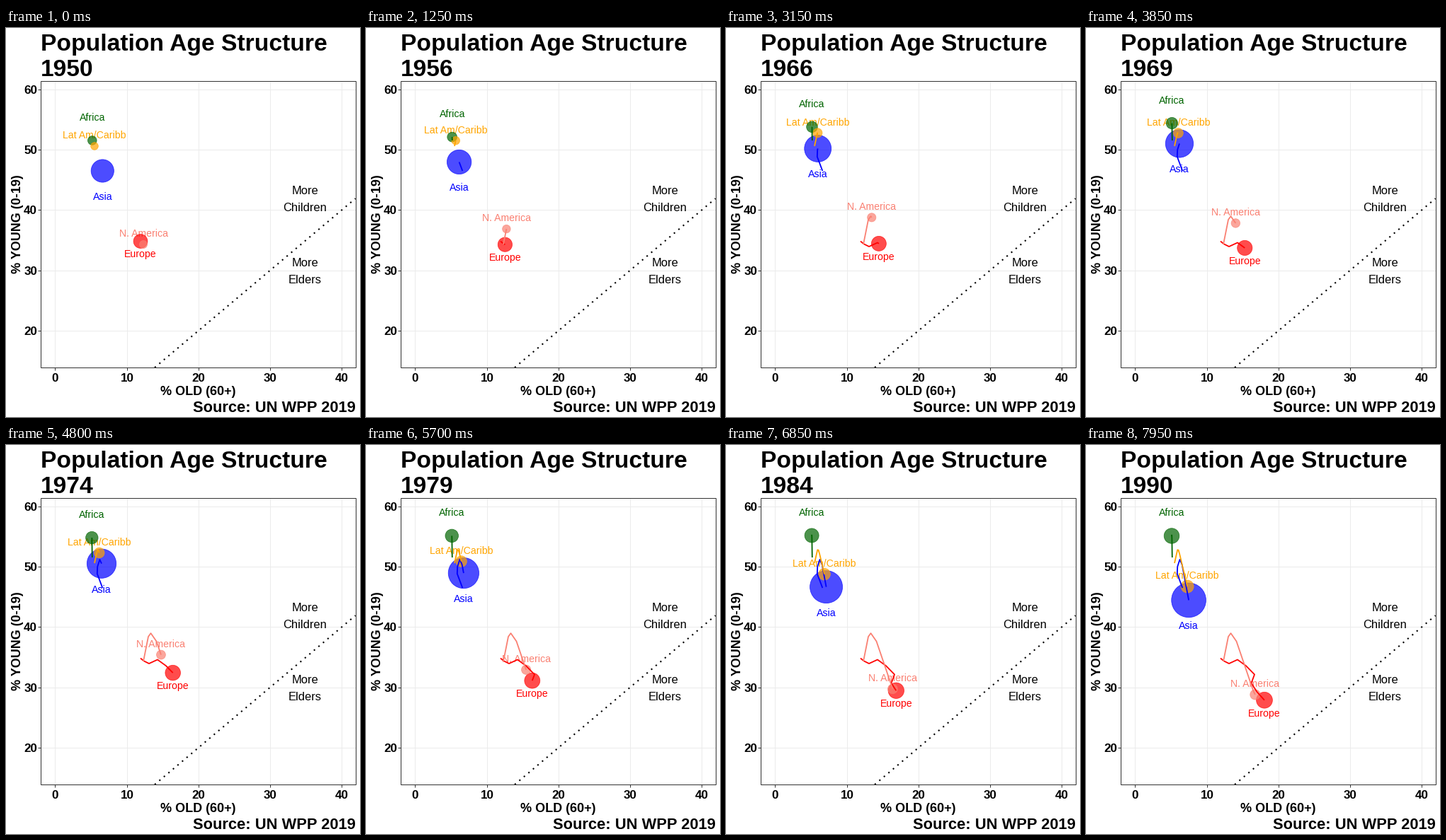
Recreate the animation shown at these times as a matplotlib script. Size 500 px wide and 550 px high, loop 8 s.

```python
import numpy as np
import matplotlib.pyplot as plt
from matplotlib.animation import FuncAnimation
from matplotlib.patches import Circle, Rectangle

W, H, DPI = 500, 550, 100
FRAMES, STEP = 160, 50
YEARS_PER_FRAME = 150 / 599
PT = 72 / DPI  # points per pixel
LEFT, RIGHT, TOP, BOTTOM = 49, 494, 75, 480

plt.rcParams["font.family"] = "Liberation Sans"
fig = plt.figure(figsize=(W / DPI, H / DPI), dpi=DPI, facecolor="white")
ax = fig.add_axes([0, 0, 1, 1])
ax.set_xlim(0, W)
ax.set_ylim(H, 0)
ax.axis("off")


def put(x, y, text, px, bold=True, ha="center", color="black", **kw):
    return ax.text(x, y, text, fontsize=px * PT, ha=ha, va="baseline", color=color,
                   fontweight="bold" if bold else "normal", **kw)


def stroke(xs, ys, px=1, color="#333333", **kw):
    return ax.plot(xs, ys, color=color, lw=px * PT, solid_capstyle="butt", **kw)[0]


def to_x(v):
    return 69.3 + 10.125 * v


def to_y(v):
    return 428 - 8.535 * (v - 20)


# Panel, grid and axes
for v in range(0, 50, 10):
    x = round(to_x(v))
    stroke([x, x], [TOP, BOTTOM], color="#EBEBEB", zorder=1)
    stroke([x, x], [BOTTOM, BOTTOM + 4], zorder=2)
    put(x, 500, str(v), 17)
for v in range(20, 70, 10):
    y = round(to_y(v))
    stroke([LEFT, RIGHT], [y, y], color="#EBEBEB", zorder=1)
    stroke([LEFT - 4, LEFT], [y, y], zorder=2)
    put(44, y + 6, str(v), 17, ha="right")
ax.add_patch(Rectangle((LEFT, TOP), RIGHT - LEFT, BOTTOM - TOP, fill=False,
                       ec="#333333", lw=PT, zorder=8))

# Diagonal where both shares are equal
diagonal = np.array([13.9, 41.9])
stroke(to_x(diagonal), to_y(diagonal), 2.1, "black", linestyle=(0, (1, 3)),
       dash_capstyle="butt", zorder=2)

# Fixed text
put(49, 32, "Population Age Structure", 33.7, ha="left")
year_text = put(49, 68, "1950", 33.7, ha="left")
put(271, 519, "% OLD (60+)", 18)
put(21, 277, "% YOUNG (0-19)", 18, rotation=90, rotation_mode="anchor")
put(494, 543, "Source: UN WPP 2019", 21.9, ha="right")
for base, word in ((235, "Children"), (337, "Elders")):
    put(422.5, base, "More", 16.5, bold=False)
    put(422.5, base + 24, word, 16.5, bold=False)

KNOTS = np.arange(0, 45, 5)


def bend(start, slope, *turns):
    """Straight course over the knots whose slope changes at each (year, change)."""
    course = start + slope * KNOTS
    for year, change in turns:
        course = course + change * np.maximum(0, KNOTS - year)
    return course


class Region:
    """Bubble, trail and label that follow a path with a knot every five years."""

    def __init__(self, name, color, lift, radii, xs, ys):
        self.lift, self.radii = lift, radii
        self.xs, self.ys = xs, ys
        self.label = put(0, 0, name, 14.1, bold=False, color=color, zorder=3)
        self.dot = Circle((0, 0), 1, color=color, alpha=0.7, lw=0.8 * PT, zorder=4)
        ax.add_patch(self.dot)
        self.trail = stroke([], [], 1.8, color, zorder=5)

    def move(self, years):
        x = np.interp(years, KNOTS, self.xs)
        y = np.interp(years, KNOTS, self.ys)
        past = KNOTS < years
        self.trail.set_data(np.append(self.xs[past], x), np.append(self.ys[past], y))
        first, last = self.radii
        self.dot.center = (x, y)
        self.dot.radius = first * (last / first) ** (years / 40)
        self.label.set_position((x, y + self.lift))


regions = [
    Region("Africa", "#006400", -28, (6.3, 10.8),
           bend(121.8, -0.02),
           bend(159, -0.6, (5, -0.9), (20, 0.9), (30, 0.7))),
    Region("Asia", "#0000FF", 41, (16.1, 24.4),
           bend(136.3, -0.75, (12, 1.39)),
           bend(202, -2, (21.85, 5.4))),
    Region("Europe", "#FF0000", 22.8, (9.9, 11.4),
           bend(190, 0.9, (8, 1.5), (25, -3.3), (31, 3.1)),
           bend(301.5, 0.75, (10, -1.85), (16, 3.55))),
    Region("Lat Am/Caribb", "#FFA500", -10.6, (5.3, 9),
           bend(125, 0.28, (25, 0.47)),
           bend(167, -1.25, (17, 2.2), (25, 2.2))),
    Region("N. America", "#FA8072", -11, (5.5, 7.1),
           bend(194, 0.7, (15, 0.9), (35, -1.1)),
           bend(306, -3.5, (12, 4.2), (18, 4), (35, -3.7))),
]


def update(i):
    years = i * YEARS_PER_FRAME
    year_text.set_text(str(1950 + int(years + 0.5)))
    for region in regions:
        region.move(years)
    return []


anim = FuncAnimation(fig, update, frames=FRAMES, interval=STEP,
                     repeat=True, repeat_delay=0, blit=False)
plt.show()
```
